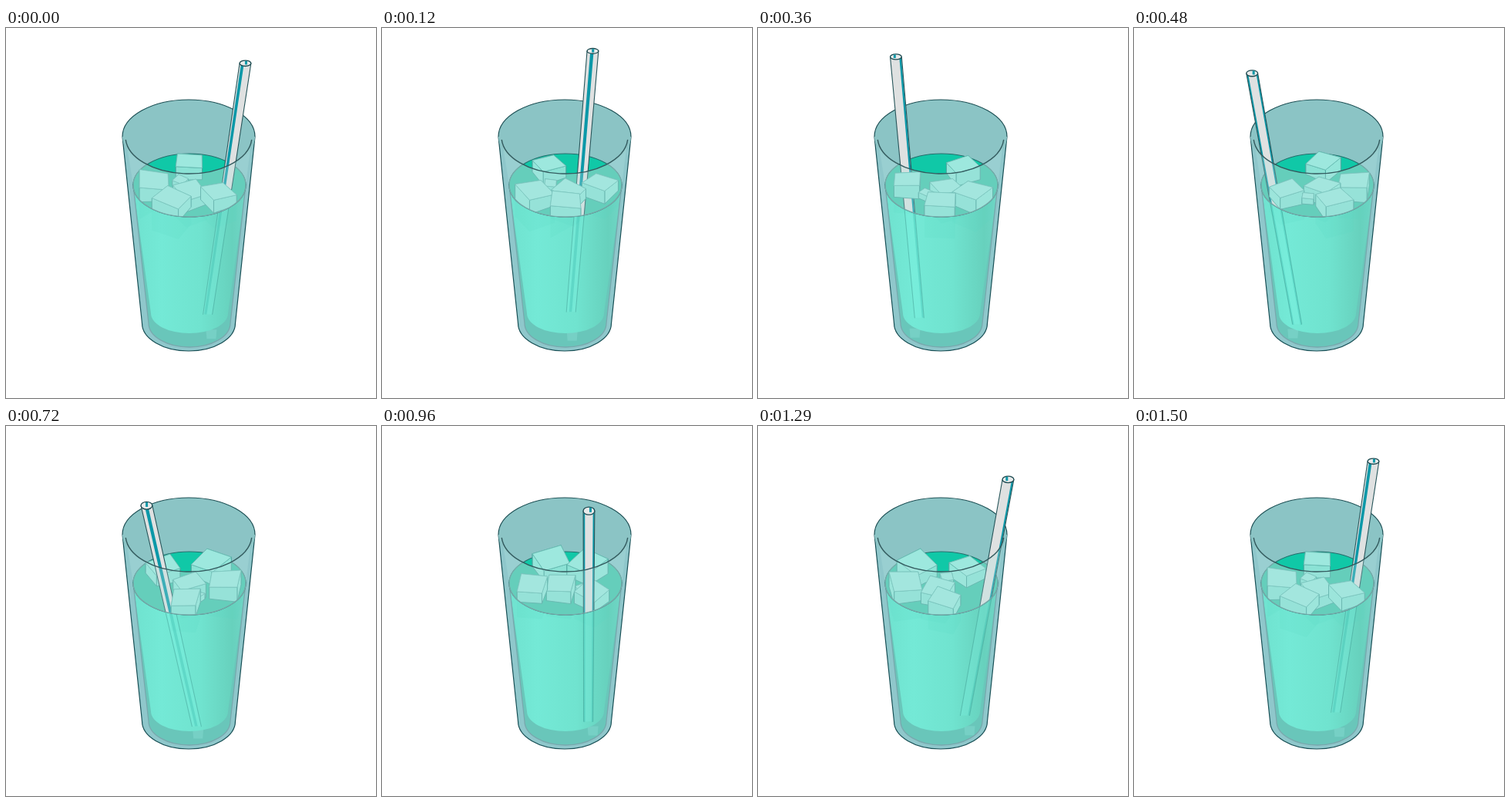
These frames come from a looping animation (480 px wide and 480 px high, 1.53 s). An HTML page with a canvas:

```html
<!DOCTYPE html>
<html lang="en">
<head>
<meta charset="utf-8">
<title>Iced drink</title>
<style>
html, body { margin: 0; width: 100%; height: 100%; overflow: hidden; background: #fff; }
canvas { display: block; width: 100vw; height: 100vh; }
</style>
</head>
<body>
<canvas id="stage" width="480" height="480"></canvas>
<script>
const g = document.getElementById('stage').getContext('2d');
const { PI, sin, cos, min, max, abs, floor, round } = Math;
const LOOP = 1530, SPAN = 1500, STEP = 30;
const rad = deg => deg * PI / 180;

// Start angle in degrees, distance from the middle, half width.
const ICE = [
  { start: -90, dist: 0.94, half: 18 },
  { start: 33, dist: 0.94, half: 18 },
  { start: 118, dist: 0.96, half: 20 },
  { start: 178, dist: 0.94, half: 20 },
  { start: 74, dist: 0.16, half: 18 },
  { start: -121, dist: 0.46, half: 8 }
];

const onOval = (cx, cy, rx, ry, a) => ({ x: cx + rx * cos(a), y: cy + ry * sin(a), a });

function paint(fill, stroke, width = 1) {
  if (fill) { g.fillStyle = fill; g.fill(); }
  if (stroke) { g.strokeStyle = stroke; g.lineWidth = width; g.stroke(); }
}

function poly(pts, fill, stroke, width) {
  g.beginPath();
  pts.forEach(p => g.lineTo(p[0], p[1]));
  g.closePath();
  paint(fill, stroke, width);
}

function oval(x, y, rx, ry, from = 0, to = 2 * PI) {
  g.beginPath();
  g.ellipse(x, y, rx, ry, 0, from, to);
}

// Tapered cup: straight sides closed by a half ellipse.
function cup(top, topHalf, x, y, rx, ry, close) {
  g.beginPath();
  g.moveTo(x + topHalf, top);
  g.lineTo(x + rx, y);
  g.ellipse(x, y, rx, ry, 0, 0, PI);
  g.lineTo(x - topHalf, top);
  if (close) g.closePath();
}

const liquidPath = () => cup(204, 73, 238, 370, 50, 26, true);
const surfacePath = () => oval(238, 204, 73, 41);

// Area seen through the front wall, above the liquid's front edge.
function frontPath() {
  g.beginPath();
  g.ellipse(237, 141, 82, 48, 0, 0, PI);
  g.lineTo(165, 204);
  g.ellipse(238, 204, 73, 41, 0, PI, 0, true);
  g.closePath();
}

function abovePath() {
  g.beginPath();
  g.moveTo(480, 0);
  g.lineTo(480, 204);
  g.ellipse(238, 204, 73, 41, 0, 0, PI);
  g.lineTo(0, 204);
  g.lineTo(0, 0);
  g.closePath();
}

function clipped(path, draw) {
  g.save();
  path();
  g.clip();
  draw();
  g.restore();
}

function cubeAt({ start, dist, half }, k, p) {
  const spin = -2 * PI * p;
  const pos = onOval(238, 205 + 11 * (1 - dist), 48 * dist, 27 * dist, rad(start) + spin);
  return { x: pos.x, y: pos.y, depth: pos.y, half, seed: k * 7, turn: k * PI / 3 + spin };
}

function corners(c, lift) {
  return [0, 1, 2, 3].map(k => {
    const a = c.turn + (k + 0.5) * PI / 2;
    const r = c.half * (1.3 + 0.1 * sin(c.seed + k * 2));
    return [c.x + r * cos(a), c.y + r * sin(a) * 0.58 - lift(k)];
  });
}

function drawIce(c) {
  const base = corners(c, () => -c.half * 0.38);
  const top = corners(c, k => c.half * (0.46 + 0.14 * sin(c.seed + k * 1.6)));
  const sides = base.map((p, k) => {
    const m = (k + 1) % 4;
    return [p, base[m], top[m], top[k]];
  });
  sides.sort((a, b) => a[0][1] + a[1][1] - b[0][1] - b[1][1]);
  sides.forEach((s, k) => poly(s, k % 2 ? '#8be2d5' : '#94e6da', '#4aa39b', 0.9));
  poly(top, '#9de8de', '#6bbdb4', 0.8);
}

function drawSunkIce(c) {
  const low = corners(c, () => -c.half * 1.5).sort((a, b) => a[0] - b[0]);
  const bottom = low[1][1] > low[2][1] ? low[1] : low[2];
  poly([[low[0][0], c.y], low[0], bottom, low[3], [low[3][0], c.y]], 'rgba(85,208,188,.14)');
}

function strawAt(p) {
  // Quick at the back of the glass, slower along the front.
  const a = rad(-33 - 360 * p - 42 * p * (1 - p) * (1 + 2.87 * p));
  const lead = rad(10 + 45 * sin(PI * p) ** 2);
  const roll = rad(-30 + 540 * p - 300 * p * (1 - p) * (1 - 0.6 * p));
  return {
    tip: onOval(237.5, 69.5, 87, 43.5, a),
    foot: onOval(239, 379, 31, 11, a - lead),
    phase: roll - PI * round(roll / PI),
    depth: 204 + 28 * sin(a)
  };
}

function drawStraw({ tip, foot, phase }, sunk) {
  const at = (end, w, k) => [end.x + w * k, end.y];
  const band = (a, b) => [at(tip, 7.4, a), at(tip, 7.4, b), at(foot, 6, b), at(foot, 6, a)];
  const teal = sunk ? 'rgba(35,165,155,.26)' : '#0b98a8';
  const sideOn = abs(sin(phase)) > 0.93;
  poly(band(-1, 1), sunk ? 'rgba(130,250,232,.2)' : '#dfe1e1');
  for (let k = -1; k <= 1; k++) {
    const mid = phase + k * PI;
    const lo = max(mid - 0.3, -PI / 2), hi = min(mid + 0.3, PI / 2);
    if (lo < hi) poly(band(sin(lo), sin(hi)), teal);
  }
  for (const k of [-1, 1]) {
    if (sideOn) poly([at(tip, 6.2, k), at(foot, 5, k)], null, teal, 2);
    poly([at(tip, 7.4, k), at(foot, 6, k)], null, sunk ? 'rgba(60,150,140,.45)' : '#28565b', 1.1);
  }
  if (sunk) return;
  const ry = 4.2 + 0.9 * sin(tip.a);
  oval(tip.x, tip.y, 7.4, ry);
  paint('#e8eaea', '#1d4a50', 1.3);
  g.fillStyle = teal;
  g.fillRect(tip.x - 1.5 - 2 * sin(phase), tip.y - ry + 0.7, 3, ry + 1);
}

const shade = g.createLinearGradient(165, 0, 311, 0);
[[0, '#6fe2cf'], [0.25, '#74e9d6'], [0.6, '#70e3cf'], [0.88, '#67d1bd'], [1, '#70d6c6']]
  .forEach(([p, c]) => shade.addColorStop(p, c));

function draw(p) {
  const straw = strawAt(p);
  const cubes = ICE.map((c, k) => cubeAt(c, k, p));

  g.fillStyle = '#fff';
  g.fillRect(0, 0, 480, 480);
  g.lineJoin = 'round';

  // Glass
  cup(141, 86, 237, 383, 60.5, 36, true);
  paint('#8fc7cb');
  cup(141, 86, 237, 383, 60.5, 36);
  paint(null, '#174f55', 1.2);
  oval(237, 141, 86, 48);
  paint('#8bc4c5');
  oval(237, 141, 86, 48, PI, 2 * PI);
  paint(null, '#1b4f54', 1.2);

  // Base and liquid
  cup(204, 73, 238, 383, 53, 31, true);
  paint('#69c6ba');
  const gx = 238 + (straw.foot.x - 238) * 1.2, gy = 400 - ((gx - 238) / 53) ** 2 * 10;
  poly([[gx - 7, gy - 6], [gx + 7, gy - 6], [gx + 6, gy + 6], [gx - 6, gy + 6]], 'rgba(150,232,222,.3)');
  liquidPath();
  paint(shade);
  clipped(liquidPath, () => {
    cubes.forEach(drawSunkIce);
    drawStraw(straw, true);
  });
  cup(204, 73, 238, 383, 53, 31);
  paint(null, '#78a9ae', 1.3);

  // Surface
  surfacePath();
  paint('#10c8a7', '#256f6d', 1.2);
  clipped(frontPath, () => {
    surfacePath();
    paint('#44c5ab', '#5c9493', 1.2);
  });
  clipped(abovePath, () => {
    [...cubes, straw].sort((a, b) => a.depth - b.depth)
      .forEach(o => o === straw ? drawStraw(o) : drawIce(o));
  });
  frontPath();
  paint('rgba(175,225,222,.3)');
  oval(238, 204, 73, 41, 0, PI);
  paint(null, '#76a9a9', 1.4);
  oval(237, 141, 82, 48, 0.08, PI - 0.08);
  paint(null, '#335a5e', 1.4);
}

function tick() {
  const t = performance.now() % LOOP;
  draw(floor(t / STEP) * STEP % SPAN / SPAN);
  requestAnimationFrame(tick);
}
tick();
</script>
</body>
</html>
```
